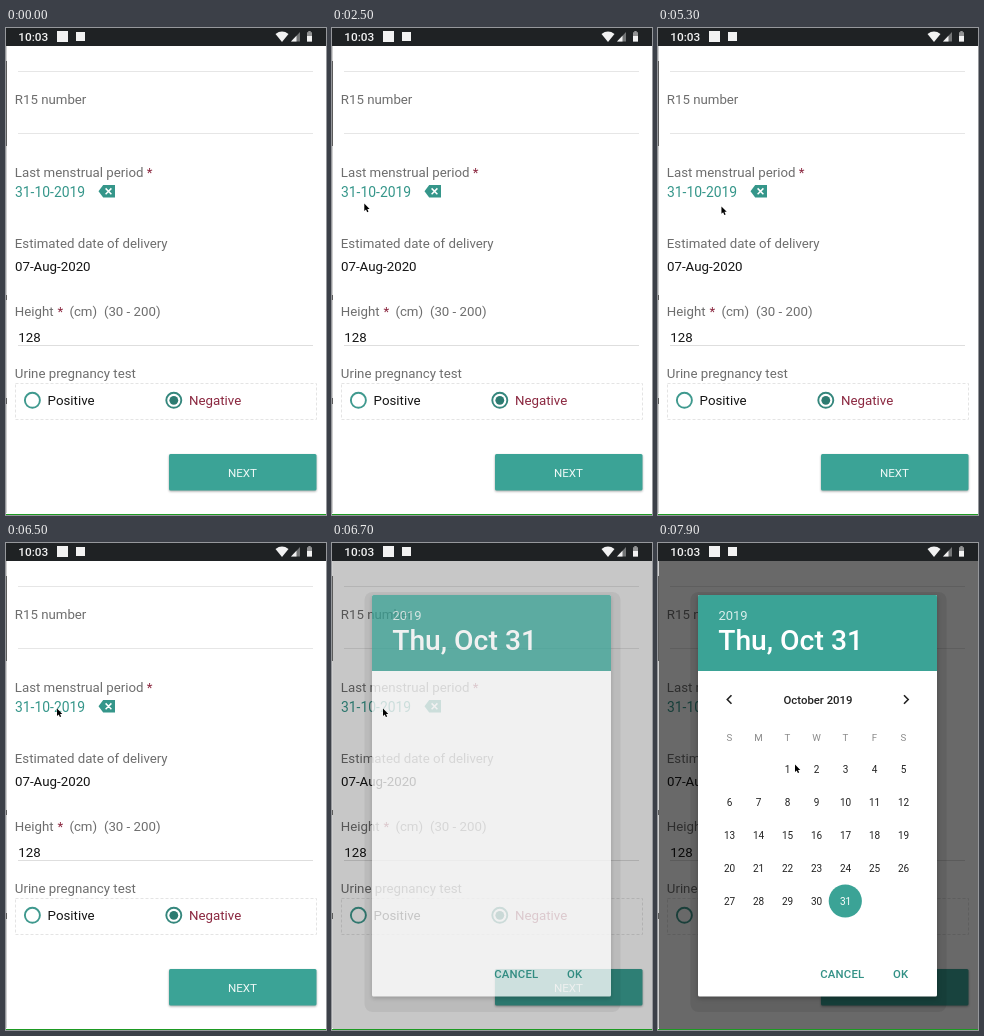
Animation, 320 px wide and 487 px high, one loop 8000 ms. Source, as an HTML page:

```html
<!DOCTYPE html>
<html lang="en">
<head>
<meta charset="utf-8">
<title>Date picker</title>
<style>
  html, body { margin: 0; width: 100%; height: 100%; overflow: hidden; background: #fff; }
  svg { display: block; width: 320px; height: 487px; font-family: Roboto, sans-serif; }
  .label { font-size: 13.25px; fill: #6e6e6e; }
  .dark { font-size: 13.3px; fill: #151515; }
  .teal { fill: #3ba396; }
  .deep { fill: #35968a; }
  .maroon { fill: #8b2840; }
  .medium { font-weight: 500; }
  .mid { text-anchor: middle; }
  .rule { stroke: #e6e6e6; }
  .action { font-size: 11.35px; font-weight: 500; letter-spacing: .2px; fill: #339186; }
  .month { font-size: 11.35px; font-weight: 500; fill: #222; }
  .week { font-size: 9.7px; fill: #8a8a8a; }
  .day { font-size: 10px; fill: #222; }
  .card { filter: drop-shadow(0 2px 2px rgba(0, 0, 0, .25)); }
  .raised { filter: drop-shadow(0 1px 1px rgba(0, 0, 0, .35)); }
</style>
</head>
<body>
<svg viewBox="0 0 320 487">
  <rect width="320" height="487" fill="#fff"/>

  <g id="form">
    <path class="rule" d="M12 43.5H307M12 105.5H307"/>
    <path d="M12 317.5H307" stroke="#dedede"/>
    <text class="label" x="8.8" y="76.3">R15 number</text>
    <text class="label" x="8.8" y="149.1">Last menstrual period <tspan class="maroon">*</tspan></text>
    <text class="deep" x="9" y="168.5" font-size="13.9">31-10-2019</text>
    <path class="deep" d="M92.5 163.3L97.2 157H109V169.6H97.2Z"/>
    <path d="M99.6 160.4L105.4 166.2M105.4 160.4L99.6 166.2" stroke="#fff" stroke-width="1.5"/>
    <text class="label" x="8.8" y="220.4">Estimated date of delivery</text>
    <text class="dark" x="9" y="243.4">07-Aug-2020</text>
    <g class="label">
      <text x="8.8" y="288.4">Height</text>
      <text class="maroon" x="51.4" y="288.4">*</text>
      <text x="63.4" y="288.4">(cm)</text>
      <text x="97.9" y="288.4">(30 - 200)</text>
    </g>
    <text class="dark" x="12.2" y="313.5">128</text>
    <text class="label" x="8.8" y="350.2">Urine pregnancy test</text>
    <rect x="9.5" y="355.5" width="301" height="36" fill="none" stroke="#e4e4e4" stroke-dasharray="3 2"/>
    <circle cx="26.4" cy="372.3" r="7.5" fill="none" stroke="#3f998e" stroke-width="1.9"/>
    <text class="dark" x="41.6" y="377.2">Positive</text>
    <circle cx="167.8" cy="372.3" r="7.5" fill="none" stroke="#35877d" stroke-width="1.9"/>
    <circle cx="167.8" cy="372.3" r="4.4" fill="#2d7b71"/>
    <text class="maroon" x="183" y="377.2" font-size="13.3">Negative</text>
    <rect class="teal raised" x="163" y="426" width="147.5" height="36.5" rx="1.5"/>
    <text class="mid" x="236.5" y="448.6" font-size="11.6" fill="#eef8f6">NEXT</text>
  </g>

  <rect id="dim" x="1" y="18" width="319" height="468" fill="#000" opacity="0"/>

  <g id="bar">
    <rect width="320" height="18" fill="#1f2224"/>
    <g fill="#f2f2f2">
      <text class="medium" x="12.3" y="13" font-size="11.8">10:03</text>
      <rect x="51" y="3" width="11" height="11"/>
      <rect x="70" y="4" width="9" height="9"/>
      <path d="M269.5 6Q276 1.2 282.5 6L276 14Z"/>
      <path d="M285 13.5L294 4V13.5Z" opacity=".4"/>
      <path d="M285 13.5L290.5 7.7V13.5Z"/>
      <path d="M301 4.2H302.3V3H304.7V4.2H306V13.5H301Z" opacity=".55"/>
      <path d="M301 8H306V13.5H301Z"/>
    </g>
  </g>

  <path d="M0.5 18V485" stroke="#cfcfcf"/>
  <path d="M0.5 33V118M0.5 267V272M0.5 370V376" stroke="#5c5c5c"/>
  <rect y="486" width="320" height="1" fill="#1d9a22"/>

  <g id="dialog" opacity="0">
    <rect x="32.5" y="49" width="256" height="420" rx="8" opacity=".08"/>
    <rect class="card" x="40" y="52" width="239" height="401.5" rx="1.5" fill="#fff"/>
    <path class="teal" d="M40 53.5Q40 52 41.5 52H277.5Q279 52 279 53.5V128H40Z"/>
    <text x="60.4" y="77" font-size="13" fill="#d9eeeb">2019</text>
    <text class="medium" x="60.2" y="106.5" font-size="28.3" fill="#fff">Thu, Oct 31</text>
    <text class="action mid" x="184.3" y="435.2">CANCEL</text>
    <text class="action mid" x="242.7" y="435.2">OK</text>
    <g id="calendar">
      <path d="M73.5 152.3L69.3 156.5L73.5 160.7M246 152.3L250.2 156.5L246 160.7"
            fill="none" stroke="#222" stroke-width="1.6"/>
      <text class="month mid" x="160" y="160.5">October 2019</text>
      <circle class="teal" cx="187.3" cy="358" r="16.6"/>
    </g>
  </g>

  <path id="cursor" d="M0 0V7.4L1.7 5.9L2.9 8.6L4.2 8L3 5.4H5.3Z"
        fill="#000" stroke="#fff" stroke-width=".7" paint-order="stroke"/>
</svg>
<script>
  const LOOP = 8000, STEP = 100;
  const get = id => document.getElementById(id);
  const dim = get('dim'), dialog = get('dialog'), calendar = get('calendar'), cursor = get('cursor');

  function addText(cls, x, y, value) {
    const el = document.createElementNS('http://www.w3.org/2000/svg', 'text');
    el.setAttribute('class', cls + ' mid');
    el.setAttribute('x', x);
    el.setAttribute('y', y);
    el.textContent = value;
    calendar.append(el);
    return el;
  }

  const columnX = col => 71.5 + 29 * col;
  [...'SMTWTFS'].forEach((name, col) => addText('week', columnX(col), 198.4, name));
  for (let day = 1; day <= 31; day++) {
    const cell = day + 1;
    const el = addText('day', columnX(cell % 7), 229.5 + 33 * Math.floor(cell / 7), day);
    if (day === 31) el.style.fill = '#fff';
  }

  // Pointer path: time, x, y
  const path = [
    [2200, 20, 158], [2500, 32.3, 175.6], [3000, 37, 173], [3300, 44, 167], [3600, 50, 168],
    [3700, 50, 168], [4200, 96, 190], [4300, 96, 190], [5200, 65, 180], [6100, 51, 165.5],
    [7500, 51, 165.5], [7900, 137, 221.5]
  ];

  function pointAt(t) {
    const i = path.findIndex(p => p[0] >= t);
    if (i < 1) return i ? path[path.length - 1].slice(1) : path[0].slice(1);
    const [a, b] = [path[i - 1], path[i]];
    const k = (t - a[0]) / (b[0] - a[0]);
    return [1, 2].map(n => a[n] + (b[n] - a[n]) * k);
  }

  // Start time, backdrop opacity, dialog opacity, calendar opacity
  const states = [[0, 0, 0, 0], [6700, .22, .76, 0], [6800, .56, 1, 0], [6900, .59, 1, 0], [7100, .59, 1, 1]];

  function draw(t) {
    const state = states.filter(s => s[0] <= t).pop();
    [dim, dialog, calendar].forEach((el, i) => el.setAttribute('opacity', state[i + 1]));
    cursor.setAttribute('visibility', t < path[0][0] ? 'hidden' : 'visible');
    cursor.setAttribute('transform', `translate(${pointAt(t)})`);
  }

  const start = performance.now();
  function tick() {
    const t = (performance.now() - start) % LOOP;
    draw(Math.floor(t / STEP) * STEP);
    requestAnimationFrame(tick);
  }
  tick();
</script>
</body>
</html>
```
